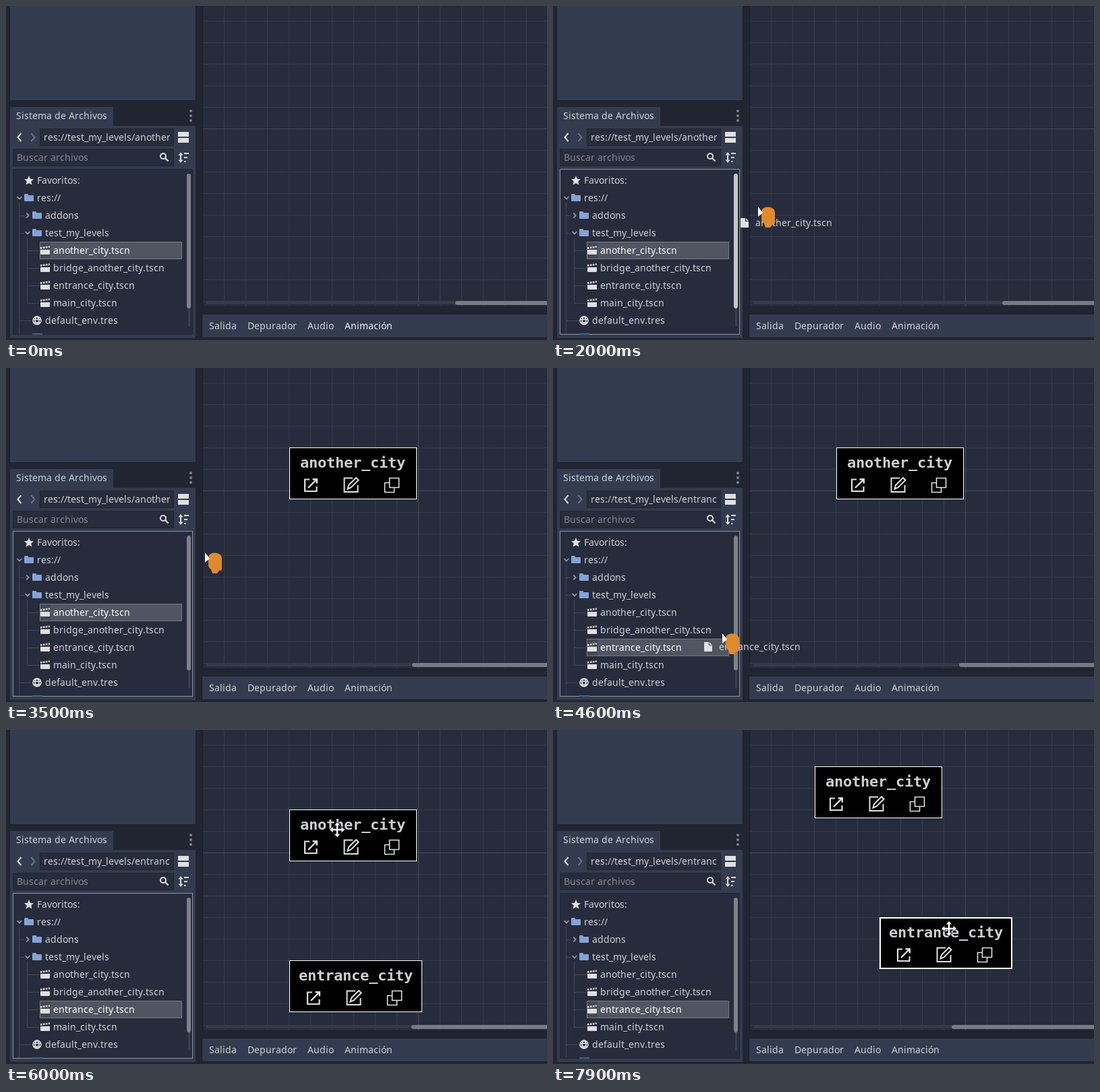
Write an HTML page that moves like this. It is 802 by 496 pixels and loops after 8000 ms.

```html
<!DOCTYPE html>
<html lang="es">
<head>
<meta charset="utf-8">
<title>Sistema de Archivos</title>
<style>
  html, body { margin: 0; width: 100%; height: 100%; overflow: hidden; background: #202531; }
  svg { display: block; width: 802px; height: 496px; }
  text { font: 14px "Noto Sans", sans-serif; fill: #cdcfd2; white-space: pre; }
  .title { font: bold 22px "DejaVu Sans Mono", monospace; fill: #cdced3; }
  .line { fill: none; stroke: #e0e0e0; }
</style>
</head>
<body>
<svg id="stage" viewBox="0 0 802 496" xmlns="http://www.w3.org/2000/svg"></svg>
<script>
const LOOP = 8000, STEP = 100, SNAP = 32;
const UI = '14px "Noto Sans", sans-serif';
const MONO = 'bold 22px "DejaVu Sans Mono", monospace';
const pen = document.createElement('canvas').getContext('2d');

// Glyph advances are rounded to whole pixels, as the editor's text renderer does.
function advances(str, x, font) {
  pen.font = font;
  return [...str].map(ch => {
    const at = x;
    x += Math.round(pen.measureText(ch).width);
    return at;
  }).join(' ');
}
const text = (x, y, str, attrs = '') =>
  `<text x="${advances(str, x, UI)}" y="${y}" ${attrs}>${str}</text>`;
const rect = (x, y, w, h, fill, attrs = '') =>
  `<rect x="${x}" y="${y}" width="${w}" height="${h}" fill="${fill}" ${attrs}/>`;
const frame = (x, y, w, h, fill, stroke, attrs = '') =>
  rect(x + .5, y + .5, w - 1, h - 1, fill, `stroke="${stroke}" ${attrs}`);
const path = (d, attrs) => `<path d="${d}" ${attrs}/>`;
const at = (x, y, body, attrs = '') => `<g transform="translate(${x} ${y})" ${attrs}>${body}</g>`;
const stroke = (d, w, color = '#e0e0e0') => path(d, `fill="none" stroke="${color}" stroke-width="${w}"`);

// Icons, all centred on their own origin
const folder = path('M-7-5q0-1 1-1h4q1 0 1 1v1H6q1 0 1 1v7q0 1-1 1H-6q-1 0-1-1z', 'fill="#84a2d6"');
const star = path('M0-7 2-2.2 7-1.8 3.2 1.6 4.4 6.6 0 3.9-4.4 6.6-3.2 1.6-7-1.8-2-2.2z', 'fill="#e0e0e0"');
const clapper = path('M-7-1H7V5q0 1-1 1H-6q-1 0-1-1z', 'fill="#e0e0e0"') +
  path('M-7-3.5 6.8-5.5', 'stroke="#e0e0e0" stroke-width="2.6" stroke-dasharray="2.6 1.4"');
const globe = stroke('M-6 0A6 6 0 1 1 6 0A6 6 0 1 1-6 0M-6-1.5H6M-5 3H5M0-6C-4-3-4 3 0 6C4 3 4-3 0-6', 1.6);
const chevronDown = stroke('M-3.5-2 0 1.7 3.5-2', 1.8, '#8b8f98');
const chevronRight = stroke('M-1.8-3.5 1.8 0-1.8 3.5', 1.8, '#8b8f98');
const page = path('M-6-7H1V-2H6V7H-6zM2-7 6-3H2z', 'fill="#e0e0e0"');

function background() {
  let s = rect(0, 0, 802, 496, '#202531');
  s += frame(5, -2, 277, 143, '#333b4f', '#1b1f2a');
  s += rect(6, 150, 153, 30, '#333b4f') + rect(6, 178, 275, 315, '#333b4f');
  s += text(15, 168, 'Sistema de Archivos');
  for (const y of [156, 163, 170]) s += `<circle cx="274" cy="${y}" r="2" fill="#7f838d"/>`;

  s += stroke('M22.5 189 17.5 195 22.5 201', 2) + stroke('M37.5 189 42.5 195 37.5 201', 2, '#6c7280');
  s += frame(50, 182, 199, 26, '#262c3b', '#1f2430');
  s += rect(255, 187, 16, 7, '#e0e0e0') + rect(255, 196, 16, 7, '#e0e0e0');
  s += frame(10, 212, 239, 26, '#262c3b', '#1f2430') + text(16, 230, 'Buscar archivos', 'style="fill:#83878f"');
  s += '<circle cx="233" cy="223" r="4" class="line" stroke-width="2"/>' + stroke('M236 226 240.5 230.5', 2.4);
  s += stroke('M259 220V230M264 219H271M264 225H269M264 231H266.5', 2);
  s += path('M255.5 221.5 259 217 262.5 221.5zM255.5 228.5 259 233 262.5 228.5z', 'fill="#e0e0e0"');

  s += rect(291, 0, 511, 447, '#262c3b');
  const line = (x, y, w, h, main) => rect(x, y, w, h, main ? '#484d5b' : '#343a49');
  for (let x = 323; x < 802; x += 32) if (x !== 611) s += line(x, 0, 1, 447);
  for (let y = 22; y < 447; y += 32) if (y !== 182) s += line(291, y, 511, 1);
  s += line(611, 0, 1, 447, true) + line(291, 182, 511, 1, true);
  s += rect(291, 0, 1, 447, '#1b1f2a') + rect(291, 446, 511, 1, '#1b1f2a');

  s += frame(290, 457, 520, 36, '#333b4f', '#1b1f2a');
  s += text(301, 480, 'Salida') + text(358, 480, 'Depurador') + text(447, 480, 'Audio');
  return s + text(502, 480, 'Animación', 'id="anim"');
}

function fileTree() {
  let s = frame(10, 242, 267, 246, '#262c3b', '#1f2430', 'id="list"');
  s += stroke('M19.5 292V487M19.5 311.5H27M19.5 337.5H27M19.5 467.5H38M31.5 344V441.5', 1, '#414757');
  for (let y = 363.5; y < 450; y += 26) s += stroke(`M31.5 ${y}H49`, 1, '#414757');
  s += at(0, 0, frame(50, 350, 211, 26, '#505561', '#777b84') + rect(51, 351, 15, 24, '#434854'), 'id="row"');
  s += at(34, 259, star) + text(46, 264, 'Favoritos:');
  s += at(20, 285, chevronDown) + at(34, 285, folder) + text(46, 290, 'res://');
  s += at(32, 311, chevronRight) + at(46, 311, folder) + text(58, 316, 'addons');
  s += at(32, 337, chevronDown) + at(46, 337, folder) + text(58, 342, 'test_my_levels');
  ['another_city', 'bridge_another_city', 'entrance_city', 'main_city'].forEach((name, i) => {
    s += at(58, 363 + 26 * i, clapper) + text(70, 368 + 26 * i, name + '.tscn', `id="file${i}"`);
  });
  s += at(46, 467, globe) + text(58, 472, 'default_env.tres');
  s += rect(39, 486, 15, 2, '#3a6685');
  s += rect(270, 249, 3, 227, '#3a4050', 'rx="1.5"');
  return s + rect(268, 249, 6, 200, '#7d8189', 'id="vthumb" rx="3"');
}

function card(id, name, w) {
  const mid = (w - 189) / 2;
  const x = Math.floor((w - 13 * name.length) / 2);
  const open = stroke('M-2-8.5H-9V9H8.5V2', 2.2) + stroke('M2.5-8.8H8.8V-2.5M8.8-8.8-4 4', 2.4);
  const edit = stroke('M2-9.5H-10.5V11H9.5V1', 2) + stroke('M-5.5 6.5-4 1 7-10 10.5-6.5-.5 4.5z', 2);
  const copy = stroke('M-3.5-10.5H10.5V3.5H-3.5zM-3.5-3.5H-10.5V10.5H3.5V3.5', 1.6);
  return at(0, 0,
    rect(0, 0, w, 77, '#000') + frame(0, 0, w, 77, 'none', '#fff', 'class="edge"') +
    `<text class="title" x="${advances(name, x, MONO)}" y="30">${name}</text>` +
    at(mid + 32, 56, open) + at(mid + 92, 55, edit) + at(mid + 152, 56, copy), `id="${id}"`);
}

const spike = 'M0-11 4-6.5H1.2V-1.2H6.5V-4L11 0 6.5 4V1.2H1.2V6.5H4L0 11-4 6.5H-1.2V1.2H-6.5V4L-11 0-6.5-4V-1.2H-1.2V-6.5H-4z';
document.getElementById('stage').innerHTML =
  '<clipPath id="field"><path d="M51 183H243V207H51z"/></clipPath>' +
  background() + fileTree() +
  '<g clip-path="url(#field)">' +
  text(56, 200, 'res://test_my_levels/another_city.tscn', 'id="path0"') +
  text(56, 200, 'res://test_my_levels/entrance_city.tscn', 'id="path1"') + '</g>' +
  '<g id="cards">' + card('cardA', 'another_city', 189) + card('cardB', 'entrance_city', 197) + '</g>' +
  rect(296, 439, 520, 4, '#343a49', 'rx="2"') + rect(0, 438, 300, 6, '#777b84', 'id="hthumb" rx="3"') +
  at(0, 0, at(-16, -5, page) + text(0, 0, 'another_city.tscn'), 'id="ghost0"') +
  at(0, 0, at(-16, -5, page) + text(0, 0, 'entrance_city.tscn'), 'id="ghost1"') +
  at(0, 0, path('M5 8C5-2 25-2 25 9V24Q25 27 21 27L18 31H11L9 25Q5 23 5 17z', 'fill="#e08a2c"') +
    path('M0 0V15L7 9z', 'fill="#fff"'), 'id="arrow"') +
  at(0, 0, path(spike, 'fill="#fff" stroke="#14171f" stroke-width="1.6" paint-order="stroke"'), 'id="move"');

const el = {};
for (const node of document.querySelectorAll('[id]')) el[node.id] = node;
const show = (node, on) => node.setAttribute('display', on ? 'inline' : 'none');
const place = (node, x, y) => node.setAttribute('transform', `translate(${x} ${y})`);

// Pointer track: time, x, y
const track = [
  [500, 545, -10], [600, 470, 30], [800, 205, 265], [1000, 95, 373], [1100, 95, 373], [1200, 95, 372],
  [1300, 95, 372], [1700, 182, 349], [2000, 304, 298], [2200, 393, 251], [2500, 447, 188],
  [2800, 469, 144], [3000, 469, 144], [3200, 420, 184], [3500, 295, 274], [3800, 157, 400],
  [4100, 155, 418], [4200, 155, 418], [4600, 251, 394], [4700, 310, 335], [4900, 440, 114],
  [5100, 470, 350], [5500, 470, 350], [6000, 491, 148], [6100, 491, 148], [6400, 555, 80],
  [6700, 456, 72], [6800, 456, 72], [7300, 523, 359], [7400, 523, 359], [7900, 587, 295]
];
function pointer(t) {
  const i = track.findIndex(k => k[0] >= t);
  if (i < 1) return track[i < 0 ? track.length - 1 : 0].slice(1);
  const a = track[i - 1], b = track[i], f = (t - a[0]) / (b[0] - a[0]);
  return [1, 2].map(n => Math.round(a[n] + (b[n] - a[n]) * f));
}

const cards = [
  { node: el.cardA, x: 420, y: 118, w: 189, born: 3000, press: 6100, release: 6800, blur: 7400 },
  { node: el.cardB, x: 420, y: 342, w: 197, born: 5200, press: 7400, release: LOOP, blur: LOOP }
];
const drags = [
  { node: el.ghost0, from: 1400, to: 3000, dx: -4, dy: 29 },
  { node: el.ghost1, from: 4400, to: 5200, dx: -5, dy: 25 }
];

function cardPos(c, t) {
  if (t < c.press) return [c.x, c.y];
  const p = pointer(Math.min(t, c.release)), q = pointer(c.press);
  const snap = n => Math.round((p[n] - q[n]) / SNAP) * SNAP;
  return [c.x + snap(0), c.y + snap(1)];
}

function draw(t) {
  const [px, py] = pointer(t);
  let right = 0, hover = false, dragging = false;

  for (const c of cards) {
    const alive = t >= c.born;
    show(c.node, alive);
    if (!alive) continue;
    const [x, y] = cardPos(c, t);
    place(c.node, x, y);
    const picked = t >= c.press && t < c.blur, inset = picked ? 1 : .5;
    const edge = c.node.querySelector('.edge');
    const box = { x: inset, y: inset, width: c.w - 2 * inset, height: 77 - 2 * inset, 'stroke-width': 2 * inset };
    for (const k in box) edge.setAttribute(k, box[k]);
    right = Math.max(right, x + c.w);
    hover = hover || (px >= x && px < x + c.w && py >= y && py < y + 77);
  }

  for (const d of drags) {
    const on = t >= d.from && t < d.to;
    show(d.node, on);
    place(d.node, px + d.dx, py + d.dy);
    dragging = dragging || on;
  }

  const cross = hover && !dragging;
  show(el.arrow, t >= 500 && !cross);
  show(el.move, cross);
  place(el.arrow, px, py);
  place(el.move, px, py);

  const second = t >= 4300;
  place(el.row, 0, second ? 52 : 0);
  show(el.path0, !second);
  show(el.path1, second);
  el.file0.style.fill = second ? '' : '#fff';
  el.file2.style.fill = second ? '#fff' : '';
  el.anim.style.fill = t < 500 ? '#eceef1' : '';
  el.list.setAttribute('stroke', t >= 1400 && t < 6100 ? '#8f939c' : '#1f2430');
  el.vthumb.setAttribute('fill', t >= 1900 && t < 3000 ? '#c4c6ca' : '#7d8189');
  el.hthumb.setAttribute('x', right ? Math.round(601 - (right - 617) * 10 / 64) : 666);
}

const start = performance.now();
function tick(now) {
  const t = Math.max(0, now - start) % LOOP;
  draw(Math.floor(t / STEP) * STEP);
  requestAnimationFrame(tick);
}
draw(0);
requestAnimationFrame(tick);
</script>
</body>
</html>
```
